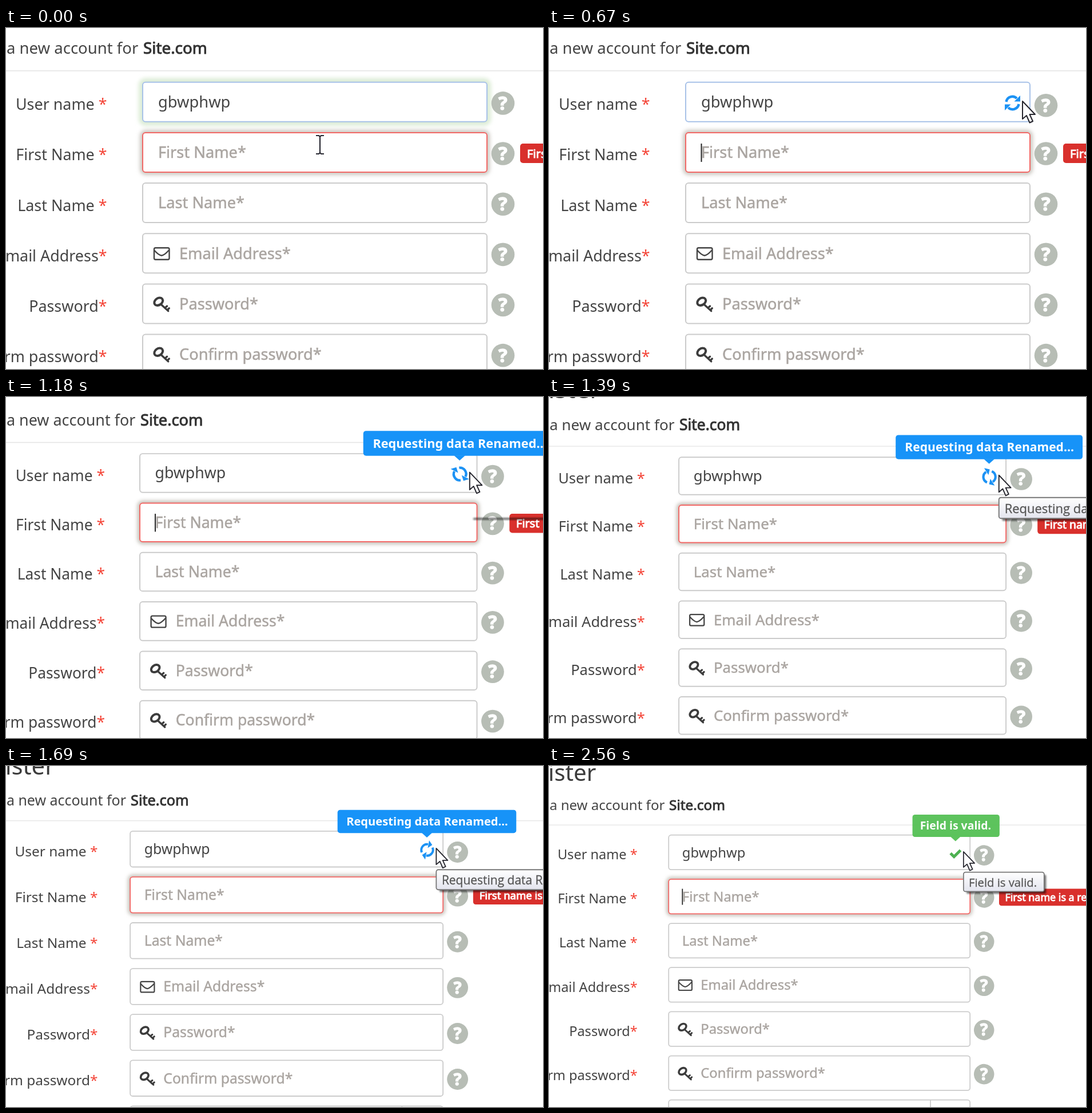
Recreate the animation shown at these times as an HTML page. Size 939 px wide and 596 px high, loop 2.59 s.

```html
<!DOCTYPE html>
<html lang="en">
<head>
<meta charset="utf-8">
<title>Sign-up form</title>
<style>
html, body { margin: 0; width: 100%; height: 100%; overflow: hidden; background: #fff; }
svg { display: block; width: 939px; height: 596px; }
text { font-family: "Noto Sans", "Open Sans", sans-serif; white-space: pre; }
.title { font-size: 46px; fill: #3c3c3c; text-anchor: end; }
.label { font-size: 26.9px; fill: #444; text-anchor: end; }
.label tspan { fill: #f44336; }
.entry { font-size: 27.3px; fill: #444; }
.hint { font-size: 27.2px; fill: #aaa5a1; stroke: #aaa5a1; stroke-width: .5; }
.head { font-size: 27.5px; fill: #444; }
.strong { font-size: 27.8px; fill: #333; stroke: #333; stroke-width: 1; }
.help { font-size: 32px; font-weight: 900; fill: #fff; stroke: #fff; stroke-width: 1.5; text-anchor: middle; }
.error { font-size: 20.4px; fill: #fff; stroke: #fff; stroke-width: 1; }
.tip { font-size: 22.2px; font-weight: 600; fill: #fff; }
.native { font-family: "Open Sans", "Noto Sans", sans-serif; font-size: 23.1px; fill: #555; stroke: #555; stroke-width: .3; }
</style>
</head>
<body>
<svg viewBox="0 0 939 596" xmlns="http://www.w3.org/2000/svg">
  <defs>
    <filter id="soft" x="-5%" y="-30%" width="110%" height="160%"><feGaussianBlur stdDeviation="3.5"/></filter>
    <filter id="shade" x="-5%" y="-30%" width="110%" height="160%"><feGaussianBlur stdDeviation="1.6"/></filter>
    <linearGradient id="glass" x1="0" y1="0" x2="0" y2="1">
      <stop offset="0" stop-color="#fff"/><stop offset="1" stop-color="#e3e4ee"/>
    </linearGradient>
    <clipPath id="unfold"><rect id="unfoldBox" x="820" width="400"/></clipPath>
  </defs>
  <g id="page"></g>
</svg>
<script>
const LOOP = 2590, HOLD = 160, STEP = 30;
const TOP = 94.8, PITCH = 88.15, LEFT = 239, WIDTH = 602, HEIGHT = 69;
const PIVOT = 303, END_SCALE = 0.8754;
const $ = id => document.getElementById(id);

const rows = [
  { label: 'User name ', entry: 'gbwphwp' },
  { label: 'First Name ', hint: 'First Name*' },
  { label: 'Last Name ', hint: 'Last Name*' },
  { label: 'Email Address', hint: 'Email Address*', icon: 'mail' },
  { label: 'Password', hint: 'Password*', icon: 'key' },
  { label: 'Confirm password', hint: 'Confirm password*', icon: 'key' }
];

const icons = {
  mail: `<g fill="none" stroke="#444" stroke-width="2.4" stroke-linejoin="round">
    <rect x="-13" y="-10" width="26.5" height="20.5" rx="2.5"/>
    <path d="M-13-6 Q-5 3 0 3.5 Q5 3 13-6"/></g>`,
  key: `<g fill="none" stroke="#3c3c3c" stroke-linecap="round" transform="translate(-.5 0) scale(1.06)">
    <ellipse cx="-4.5" cy="-4" rx="7.6" ry="5.6" transform="rotate(-35 -4.5 -4)" stroke-width="3.8"/>
    <path d="M0 1 L11.5 11.5 M6 6.5 L9.5 3.5 M10 10 L13 7" stroke-width="3.2"/></g>`
};

const box = (y, attrs) =>
  `<rect x="${LEFT}" y="${y}" width="${WIDTH}" height="${HEIGHT}" rx="5" ${attrs}/>`;

function row(r, i) {
  const y = TOP + i * PITCH;
  const glow = i === 0 ? `<g id="glow" filter="url(#soft)">${box(y, 'fill="none" stroke="#dcecd6" stroke-width="14"')}</g>`
    : i === 1 ? `<g filter="url(#soft)">${box(y, 'fill="none" stroke="#c6c2bb" stroke-width="9"')}</g>` : '';
  const border = i === 1 ? '#f26866' : '#cbcbcb';
  const x = r.icon ? 303 : 266;
  return `${glow}
    ${box(y, `${i ? '' : 'id="userBox"'} fill="#fff" stroke="${border}" stroke-width="2"`)}
    <text class="label" x="176.6" y="${y + 48.4}">${r.label}<tspan>*</tspan></text>
    <text class="${r.entry ? 'entry' : 'hint'}" x="${x}" y="${y + 44.3}">${r.entry || r.hint}</text>
    ${r.icon ? `<g transform="translate(272 ${y + 35})">${icons[r.icon]}</g>` : ''}
    <g ${i ? '' : 'id="userHelp"'}><circle cx="869" cy="${y + 36.6}" r="20.3" fill="#b7bdb5"/>
    <text class="help" x="869" y="${y + 48}">?</text></g>`;
}

const tip = (id, x, w, mid, textX, fill, text) =>
  `<g id="${id}"><rect x="${x}" y="54" width="${w}" height="44.5" rx="5" fill="${fill}"/>
   <path d="M${mid - 10} 98 h20 l-10 9z" fill="${fill}"/>
   <text class="tip" x="${textX}" y="84">${text}</text></g>`;

const refreshArc = `<path d="M-11-2 A11 11 0 0 1 7.5-8" fill="none" stroke="#1c92f4" stroke-width="4.4"/>
  <path d="M13.5-13 V-2.5 H3z" fill="#1c92f4"/>`;

const lastTop = TOP + rows.length * PITCH;

$('page').innerHTML = `
  <text class="title" x="94" y="-14">Register</text>
  <text class="head" x="1" y="45">a new account for</text>
  <text class="head strong" x="240" y="45">Site.com</text>
  <path d="M0 74.7 H1100" stroke="#e4e4e4" stroke-width="1.4"/>
  ${rows.map(row).join('')}
  ${box(lastTop, 'fill="#fff" stroke="#cbcbcb" stroke-width="2"')}
  <path d="M762 ${lastTop} v${HEIGHT}" stroke="#cbcbcb" stroke-width="2"/>
  <path id="caret" d="M266.5 202 V234" stroke="#222" stroke-width="2"/>
  <rect x="899" y="202" width="270" height="34" rx="5" fill="#d9302c"/>
  <text class="error" x="911" y="226.5">First name is a required field</text>
  <g id="spinner">${refreshArc}<g transform="rotate(180)">${refreshArc}</g></g>
  <path id="check" d="M802 131 L809 138 L822 125" fill="none" stroke="#4db151" stroke-width="5.6"/>
  ${tip('busyTip', 638, 344, 810, 655, '#1793f8', 'Requesting data Renamed...')}
  ${tip('validTip', 726, 174, 812, 741, '#58c258', 'Field is valid.')}
  <g id="native">
    <rect id="nativeShade" x="834" rx="3" fill="#000" opacity=".55" filter="url(#shade)"/>
    <g clip-path="url(#unfold)">
      <rect id="nativeBox" x="828" y="169" height="38.5" rx="4" fill="url(#glass)" stroke="#777" stroke-width="2"/>
      <text id="nativeText" class="native" x="838.5" y="197.5"></text>
    </g>
  </g>
  <path id="beam" d="M-7-16 H-2 L0-14 L2-16 H7 M0-14 V14 M-7 16 H-2 L0 14 L2 16 H7"
    fill="none" stroke="#2a2a33" stroke-width="2.2"/>
  <path id="arrow" d="M0 0 V31 L7 25 L12.5 37.5 L18 35 L12.5 23 H22Z"
    fill="#fff" stroke="#26262e" stroke-width="2" stroke-linejoin="round"/>`;

const ramp = (t, a, b) => Math.min(1, Math.max(0, (t - a) / (b - a)));
const smooth = p => p * p * (3 - 2 * p);
const mix = (a, b, p) => a + (b - a) * p;
const show = (id, on) => $(id).setAttribute('visibility', on ? 'visible' : 'hidden');
const set = (id, attrs) => { for (const k in attrs) $(id).setAttribute(k, attrs[k]); };

function popUp(id, p, fade) {
  set(id, {
    opacity: p * fade,
    transform: `translate(0 ${46 * (1 - p) ** 2})`
  });
}

function draw(t) {
  const s = mix(1, END_SCALE, ramp(t, 1030, 1930));
  set('page', { transform: `translate(0 ${PIVOT * (1 - s)}) scale(${s})` });

  // focus leaves the user name
  set('glow', { opacity: 1 - ramp(t, 160, 430) });
  const grey = ramp(t, 670, 880);
  set('userBox', { stroke: `rgb(${mix(168, 203, grey)},${mix(194, 203, grey)},${mix(232, 203, grey)})` });
  show('caret', t >= 190 && (t < 1300 || t >= 1810));

  const checking = t >= 250, valid = t >= 2080;
  set('userHelp', { transform: `translate(0 ${checking ? 3.8 : 0})` });
  show('spinner', checking && !valid);
  set('spinner', { transform: `translate(810.5 131) rotate(${(t - 670) / 7})` });
  show('check', valid);

  popUp('busyTip', ramp(t, 690, 930), 1 - ramp(t, 2050, 2170));
  popUp('validTip', ramp(t, 2290, 2560), 0.97);

  // system tooltip
  const done = t >= 2200, open = ramp(t, 1180, 1300), w = done ? 161 : 330;
  show('native', t >= 1180);
  set('nativeBox', { width: w });
  set('nativeShade', { width: w - 2, y: mix(209, 174, open), height: mix(4, 38, open) });
  set('unfoldBox', { y: mix(209, 165, open), height: mix(0, 44, open) });
  $('nativeText').textContent = done ? 'Field is valid.' : 'Requesting data Renamed...';

  // pointer
  const p = smooth(ramp(t, 190, 640));
  const x = mix(549, 828, p), y = mix(204, 128, p), pointing = x > 792;
  show('beam', !pointing);
  show('arrow', pointing);
  for (const id of ['beam', 'arrow']) set(id, { transform: `translate(${x} ${y})` });
}

let start;
function tick(now) {
  start ??= now;
  const t = (now - start) % LOOP;
  draw(t < HOLD ? 0 : HOLD + STEP * Math.floor((t - HOLD) / STEP));
  requestAnimationFrame(tick);
}
draw(0);
requestAnimationFrame(tick);
</script>
</body>
</html>
```
